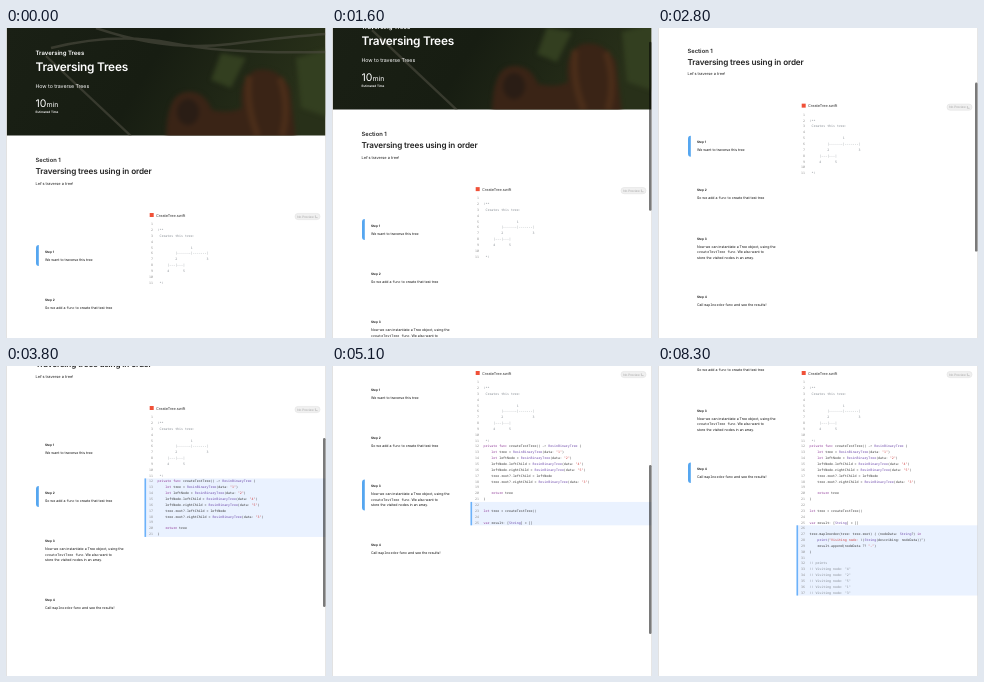
An HTML page that plays this animation: 320 px wide and 310 px high, repeating every 9100 ms.

```html
<!DOCTYPE html>
<html lang="en">
<head>
<meta charset="utf-8">
<title>Traversing Trees</title>
<style>
html, body { margin: 0; width: 100%; height: 100%; overflow: hidden; background: #fff; }
svg { display: block; width: 320px; height: 310px; }
text { font-family: Inter, "Open Sans", sans-serif; white-space: pre; text-rendering: geometricPrecision; }
.b { font-weight: 600; }
.hero text { fill: #fff; }
.mono, .code text { font-family: "Noto Sans Mono", "DejaVu Sans Mono", monospace; }
.code text { font-size: 3.275px; fill: #333; }
.code .num { fill: #888; text-anchor: end; }
.code .com { fill: #858b92; }
.kw { fill: #8f3a98; }
.type { fill: #6a45a8; }
.str { fill: #cf3a3a; }
</style>
</head>
<body>
<svg viewBox="0 0 320 310">
  <defs>
    <linearGradient id="jungle" x2="1" y2=".2">
      <stop offset="0" stop-color="#1a2015"/>
      <stop offset=".5" stop-color="#171d12"/>
      <stop offset="1" stop-color="#283019"/>
    </linearGradient>
    <filter id="soft" color-interpolation-filters="sRGB"><feGaussianBlur stdDeviation="2"/></filter>
    <clipPath id="heroBox"><rect x=".8" width="318.7" height="107.5"/></clipPath>
  </defs>
  <rect width="320" height="310" fill="#fff"/>
  <g id="page">
    <g class="hero" clip-path="url(#heroBox)">
      <rect width="320" height="108" fill="url(#jungle)"/>
      <g filter="url(#soft)">
        <path d="M290 30l35-10v70l-30-10zM215 25l25 5-15 30-20-8z" fill="#333f20"/>
        <path d="M160 112Q160 66 180 64Q198 62 206 82Q225 86 236 80Q232 50 250 42Q272 38 284 60L290 112Z" fill="#3a2416"/>
        <path d="M243 48Q240 80 252 108M274 50Q284 78 276 108" fill="none" stroke="#4a2d19" stroke-width="7"/>
        <ellipse cx="182" cy="84" rx="11" ry="13" fill="#2a1d15"/>
      </g>
      <path d="M45 20Q110 4 165 15T320 24M90 0Q160 24 225 16T320 6M40 28L125 108" fill="none" stroke="#4a4a3e" stroke-width="2.4" opacity=".65"/>
      <text class="b" x="29.5" y="27.2" font-size="6">Traversing Trees</text>
      <text class="b" x="29.5" y="42.5" font-size="11.85" letter-spacing="-.23">Traversing Trees</text>
      <text x="29.5" y="60" font-size="5.25" letter-spacing="-.05">How to traverse Trees</text>
      <text x="29.5" y="78.8" font-size="10.5">10<tspan font-size="7">min</tspan></text>
      <text class="b" x="29.5" y="85.3" font-size="3.05">Estimated Time</text>
    </g>
    <g fill="#222">
      <text class="b" x="29.5" y="134.2" font-size="5.8">Section 1</text>
      <text class="b" x="29.5" y="146.2" font-size="8.15" letter-spacing="-.12">Traversing trees using in order</text>
      <text x="29.5" y="156.7" font-size="3.9">Let's traverse a tree!</text>
    </g>
    <g id="steps" fill="#111"></g>
    <path id="bar" fill="#55a6f0"/>
  </g>
  <g id="panel">
    <rect x="143.7" y="185" width="4" height="4" fill="#f05138"/>
    <text x="150" y="188.5" font-size="3.8" fill="#333">CreateTree.swift</text>
    <rect x="289" y="185.4" width="25" height="6.2" rx="3" fill="#f0f0f0" stroke="#dedede" stroke-width=".5"/>
    <text x="291.2" y="189.6" font-size="3.1" fill="#a5a5a5">No Preview</text>
    <path d="M309.4 187.4v2.2h2.2" fill="none" stroke="#a5a5a5" stroke-width=".5"/>
    <rect id="mark" x="138.5" width="181.5" fill="#eaf2ff"/>
    <rect id="edge" x="138.5" width="1.6" fill="#6cb2fa"/>
    <g id="code" class="code"></g>
  </g>
  <path d="M.4 0V310M319.75 0V310" stroke="#d6d6d6" stroke-width=".8"/>
  <rect id="thumb" x="317" width="2.5" height="169" rx="1.2" fill="#000"/>
</svg>
<script>
const $ = id => document.getElementById(id);
const LOOP = 9100, LINE = 5.85, FIRST = 196;

const mono = s => `<tspan class="mono" font-size="3.38">${s}</tspan>`;
const steps = [
  { top: 217, h: 21, from: 1, to: 11, text: ['We want to traverse this tree'] },
  { top: 265, h: 21, from: 12, to: 21, text: [`So we add a ${mono('func')} to create that test tree`] },
  { top: 313.5, h: 31, from: 22, to: 25, text: [
    'Now we can instantiate a Tree object, using the',
    `${mono('createTestTree func')}. We also want to`,
    'store the visited nodes in an array.'] },
  { top: 372, h: 20.5, from: 26, to: 37, text: [`Call ${mono('mapInorder')} func and see the results!`] }
];

const pad = n => ' '.repeat(n);
const node = n => `ResinBinaryTree(data: "${n}")`;
const lines = [
  '', '/**', ' Creates this tree:', '',
  pad(17) + '1',
  pad(9) + '|-------|-------|',
  pad(9) + '2' + pad(15) + '3',
  pad(5) + '|---|---|',
  pad(5) + '4' + pad(7) + '5',
  '', ' */',
  'private func createTestTree() -> ResinBinaryTree {',
  '    let tree = ' + node(1),
  '    let leftNode = ' + node(2),
  '    leftNode.leftChild = ' + node(4),
  '    leftNode.rightChild = ' + node(5),
  '    tree.root?.leftChild = leftNode',
  '    tree.root?.rightChild = ' + node(3),
  '', '    return tree', '}', '',
  'let tree = createTestTree()', '',
  'var result: [String] = []', '',
  'tree.mapInorder(tree: tree.root) { (nodeData: String?) in',
  '    print("Visiting node: \\(String(describing: nodeData))")',
  '    result.append(nodeData ?? "-")',
  '}', '', '// prints',
  ...[4, 2, 5, 1, 3].map(n => `// Visiting node: "${n}"`)
];

const token = /("[^"\\]*(?:"|(?=\\)))|\b(private|func|let|var|return|in)\b|\b(ResinBinaryTree|String|print)\b/g;
const paint = s => s.replace('>', '&gt;').replace(token, (m, str, kw) =>
  `<tspan class="${str ? 'str' : kw ? 'kw' : 'type'}">${m}</tspan>`);

$('code').innerHTML = lines.map((s, i) => {
  const y = FIRST + i * LINE + 1.1;
  const comment = i < 11 || s.startsWith('//');
  return `<g><text class="num" x="147" y="${y}">${i + 1}</text>` +
    `<text x="151.5" y="${y}" class="${comment ? 'com' : ''}">${comment ? s : paint(s)}</text></g>`;
}).join('');

$('steps').innerHTML = steps.map((s, i) =>
  `<text class="b" x="39" y="${s.top + 7.7}" font-size="3.15">Step ${i + 1}</text>` +
  s.text.map((t, k) => `<text x="39" y="${s.top + 15.6 + k * 5.5}" font-size="3.53">${t}</text>`).join('')
).join('');

// Scroll offset over time: [ms, px]
const keys = [
  [0, 0], [400, 0], [1000, 17.5], [1300, 23], [1500, 23], [2100, 74], [2500, 95],
  [2900, 111], [3100, 111], [3800, 145], [3900, 145], [4600, 171], [4700, 171],
  [5100, 200], [5200, 200], [5800, 220], [6000, 220], [6700, 251.5], [7000, 264],
  [7400, 275.5], [LOOP, 275.5]
];
const rate = i => i < 0 || i > keys.length - 2 ? 0 :
  (keys[i + 1][1] - keys[i][1]) / (keys[i + 1][0] - keys[i][0]);
const tangent = i => {
  const a = rate(i - 1), b = rate(i);
  return a && b ? 2 * a * b / (a + b) : 0;
};

// Monotone cubic through the keys
function scrollAt(t) {
  let i = 0;
  while (i < keys.length - 2 && t >= keys[i + 1][0]) i++;
  const [t0, a] = keys[i], [t1, b] = keys[i + 1];
  const d = t1 - t0, u = (t - t0) / d, v = 1 - u;
  return a * v * v * (1 + 2 * u) + b * u * u * (3 - 2 * u) +
    d * (tangent(i) * u * v * v - tangent(i + 1) * u * u * v);
}

function set(el, attrs) {
  for (const k in attrs) el.setAttribute(k, attrs[k]);
}

function draw(ms) {
  const t = Math.floor(ms / 100 + .05) * 100 % LOOP;
  const y = scrollAt(t);
  let active = 0;
  steps.forEach((s, i) => { if (s.top - y < 155) active = i; });
  const { top, h, from, to } = steps[active];

  set($('page'), { transform: `translate(0 ${-y})` });
  set($('panel'), { transform: `translate(0 ${-Math.min(y, 180)})` });
  set($('bar'), { d: `M32.8 ${top}Q30 ${top} 30 ${top + 3}V${top + h - 3}Q30 ${top + h} 32.8 ${top + h}Z` });

  const box = {
    y: FIRST + (from - 1.5) * LINE,
    height: (to - from + 1) * LINE,
    visibility: active ? 'visible' : 'hidden'
  };
  set($('mark'), box);
  set($('edge'), box);
  [...$('code').children].forEach((g, i) => set(g, { visibility: i < to ? 'visible' : 'hidden' }));

  const shown = t < 500 ? 0 : Math.max(0, Math.min(1, (8300 - t) / 300));
  set($('thumb'), { y: 1 + .49 * y, opacity: .52 * shown });
}

let start;
function tick(now) {
  start ??= now;
  draw(now - start);
  requestAnimationFrame(tick);
}
draw(0);
requestAnimationFrame(tick);
</script>
</body>
</html>
```
